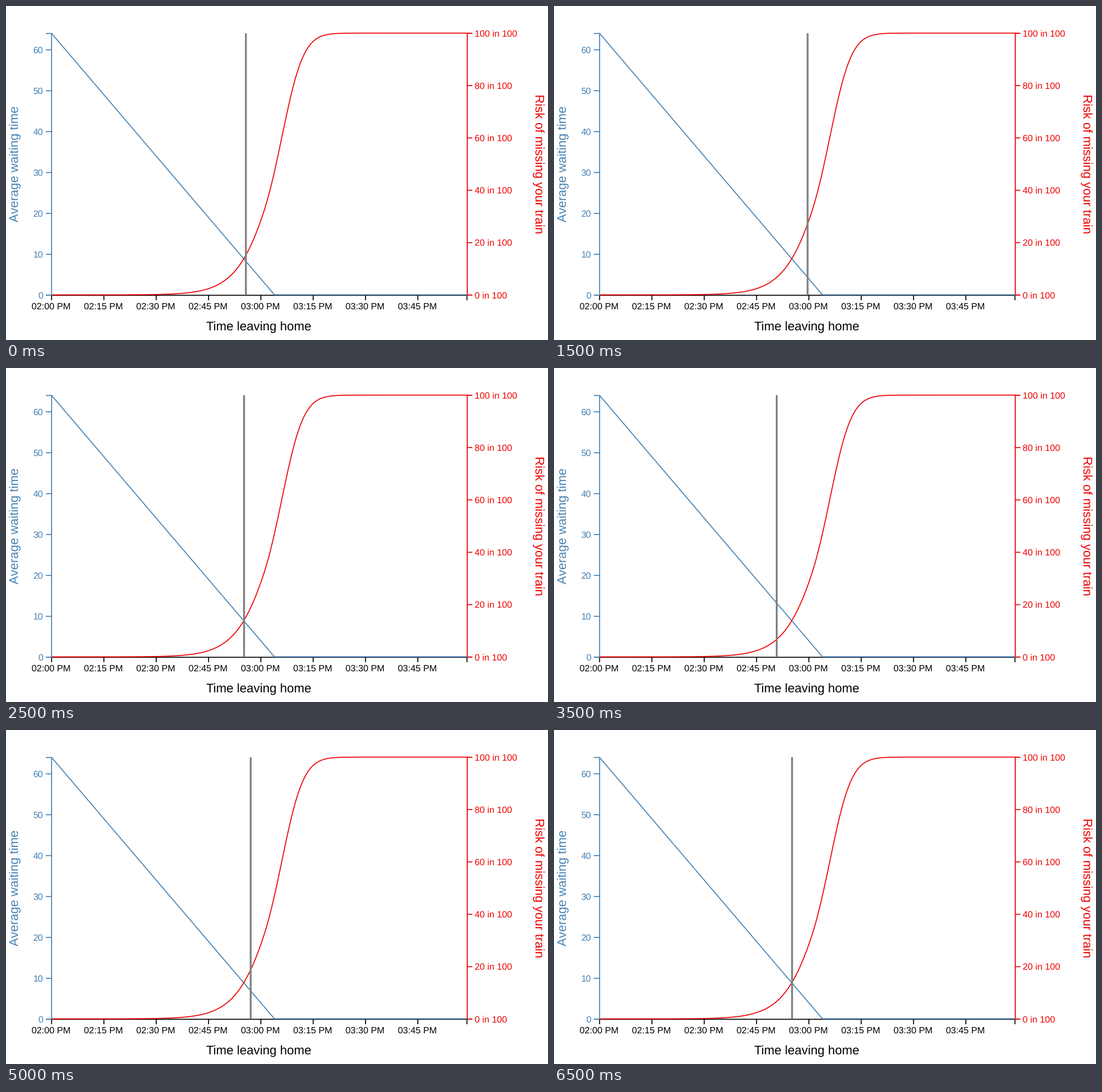
Recreate the animation shown at these times as a matplotlib script. Size 953x588 px, loop 8.5 s.

```python
import numpy as np
import matplotlib.pyplot as plt
from matplotlib.animation import FuncAnimation

plt.rcParams["font.family"] = "Liberation Sans"
plt.rcParams["text.hinting"] = "none"
plt.rcParams["text.hinting_factor"] = 1

W, H = 953, 588
LEFT, RIGHT, TOP, BASE = 80.2, 811, 47.9, 508.8
BLUE, RED, GRAY = "#4682b4", "#ee0000", "#808080"
LINE = 1.7

# dpi 72: one point equals one pixel
fig = plt.figure(figsize=(W / 72, H / 72), dpi=72, facecolor="white")
ax = fig.add_axes([0, 0, 1, 1])
ax.set_xlim(0, W)
ax.set_ylim(H, 0)
ax.axis("off")


def line(x, y, color, width=LINE, z=2):
    return ax.plot(x, y, color=color, lw=width, zorder=z, snap=False,
                   solid_capstyle="butt", solid_joinstyle="miter")[0]


def label(x, y, text, color, size=16, ha="center", angle=0):
    ax.text(x, y, text, color=color, fontsize=size, ha=ha, va="baseline",
            rotation=angle, rotation_mode="anchor")


def risk(x):
    """Logistic rise that steepens past its lower bend."""
    logit = (-0.985 + 0.0303 * (x - 446)
             + 0.0002 * np.maximum(x - 452, 0) ** 2)
    return 1 / (1 + np.exp(-logit))


# Time axis
line([LEFT, RIGHT], [BASE + 0.5] * 2, "black")
for k in range(8):
    x = LEFT + 92 * k
    line([x, x], [BASE, 518], "black")
    label(x - 0.5, 534.3, f"{2 + k // 4:02d}:{15 * (k % 4):02d} PM", "black")
line([RIGHT - 0.5] * 2, [BASE, 518], "black")
label(444.6, 571, "Time leaving home", "black", 22.2)

# Waiting time axis
line([70, LEFT, LEFT, 70], [TOP + 0.5, TOP + 0.5, BASE + 0.5, BASE + 0.5], BLUE)
for value in range(0, 70, 10):
    y = BASE + 0.4 - 7.2 * value
    line([70, LEFT], [y, y], BLUE)
    label(65.3, y + 5.7, str(value), BLUE, ha="right")
label(22.4, 277.8, "Average waiting time", BLUE, 22.3, angle=90)

# Risk axis
line([820, RIGHT, RIGHT, 820], [TOP, TOP, BASE, BASE], RED)
for value in range(0, 101, 20):
    y = BASE + (TOP - BASE) * value / 100
    line([RIGHT, 820], [y, y], RED)
    label(824.5, y + 5.6, f"{value} in 100", RED, ha="left")
label(929.3, 277.8, "Risk of missing your train", RED, 22.3, angle=270)

# Curves
line([LEFT, 472, RIGHT], [TOP + 0.4, BASE - 0.4, BASE - 0.4], BLUE, z=3)
xs = np.linspace(LEFT, RIGHT, 1000)
line(xs, BASE - 0.2 + (TOP - BASE) * risk(xs), RED, z=4)

# Marker wanders around the crossing, then rests there
STOPS = [421.8, 437, 451, 445.9, 433, 418.6, 408, 391.6,
         415.5, 421.8, 430.2, 415.5, 421.8, 418.6]
marker = line([STOPS[0]] * 2, [TOP, BASE], GRAY, 3.3, z=5)


def update(i):
    x = STOPS[min(i, len(STOPS) - 1)]
    marker.set_xdata([x, x])
    return [marker]


anim = FuncAnimation(fig, update, frames=17, interval=500, repeat=True,
                     repeat_delay=0)
plt.show()
```
